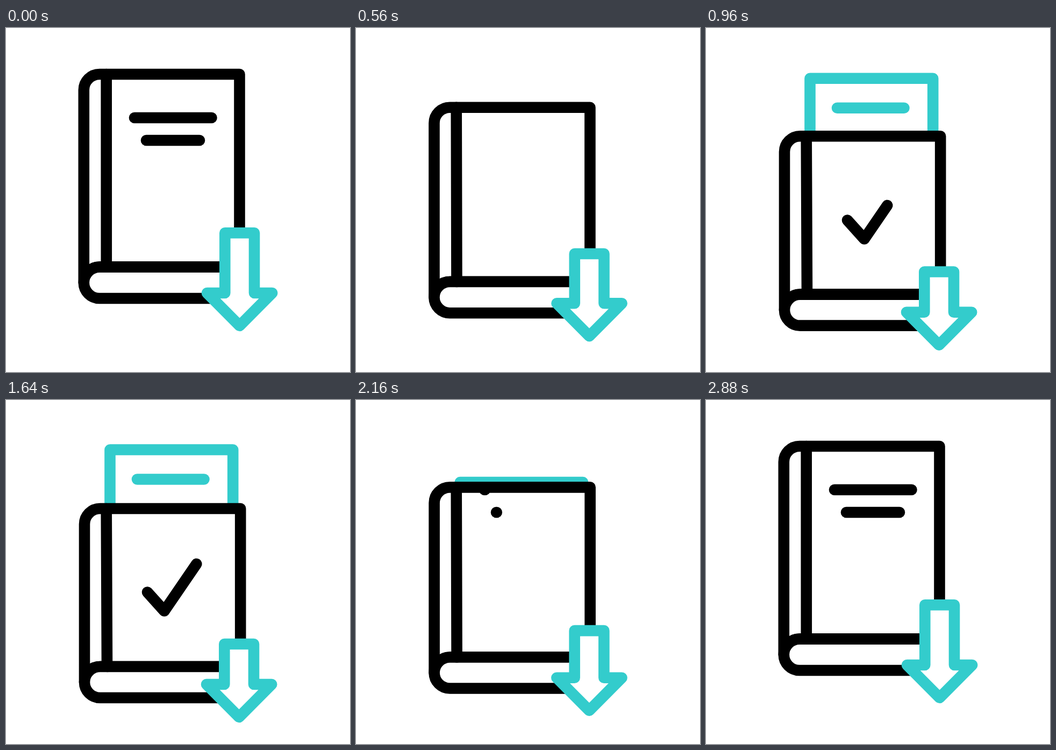
Animation, 640 px wide and 640 px high, one loop 3000 ms. Source, as an HTML page with a canvas:

```html
<!DOCTYPE html>
<html lang="en">
<head>
<meta charset="utf-8">
<title>Book download</title>
<style>
html, body { margin: 0; width: 100%; height: 100%; overflow: hidden; background: #fff; }
canvas { display: block; width: 100vmin; height: 100vmin; margin: 0 auto; }
</style>
</head>
<body>
<canvas id="stage" width="640" height="640"></canvas>
<script>
const ctx = document.getElementById('stage').getContext('2d');
const LOOP = 3000;
const INK = '#000', CYAN = '#33cccc', PAPER = '#fff';

// Strong symmetric ease, cubic-bezier(2/3, 0, 1/3, 1)
function ease(x) {
  if (x <= 0) return 0;
  if (x >= 1) return 1;
  let lo = 0, hi = 1;
  for (let i = 0; i < 24; i++) {
    const s = (lo + hi) / 2, r = 1 - s;
    const bx = 2 * s * r * r + s * s * r + s * s * s;
    if (bx < x) lo = s; else hi = s;
  }
  return lo * lo * (3 - 2 * lo);
}

const ramp = (t, start, end) => ease((t - start) / (end - start));
const mix = (a, b, k) => a + (b - a) * k;

function shape(color, fill, build) {
  ctx.beginPath();
  build();
  if (fill) {
    ctx.fillStyle = fill;
    ctx.fill();
  }
  ctx.strokeStyle = color;
  ctx.stroke();
}

function trace(points) {
  points.forEach(([x, y], i) => i ? ctx.lineTo(x, y) : ctx.moveTo(x, y));
}

// Draws the first part k of a polyline
function trimmed(color, points, k) {
  if (k < 0.002) return;
  const dist = (a, b) => Math.hypot(b[0] - a[0], b[1] - a[1]);
  let total = 0;
  for (let i = 1; i < points.length; i++) total += dist(points[i - 1], points[i]);
  let left = total * k;
  const part = [points[0]];
  for (let i = 1; i < points.length && left > 0; i++) {
    const a = points[i - 1], b = points[i], d = dist(a, b);
    const f = Math.min(1, left / d);
    part.push([mix(a[0], b[0], f), mix(a[1], b[1], f)]);
    left -= d;
  }
  shape(color, null, () => trace(part));
}

function drawSheet(p) {
  const y = mix(270, 92.5, p);
  shape(CYAN, PAPER, () => ctx.rect(193.5, y, 228.7, 150));
  trimmed(CYAN, [[244, y + 55], [368.5, y + 55]], 1);
}

function drawBook(p) {
  const left = mix(144.8, 146, p), right = mix(434.5, 436.2, p);
  const top = mix(86, 202, p), mid = mix(444.6, 496, p), base = mix(503, 554, p);
  const r = (base - mid) / 2, bend = left + r;

  // Cover
  shape(INK, PAPER, () => {
    ctx.moveTo(right, mid);
    ctx.lineTo(right, top);
    ctx.lineTo(bend, top);
    ctx.arc(bend, top + r, r, -Math.PI / 2, Math.PI, true);
    ctx.lineTo(left, base - r);
    ctx.arc(bend, mid + r, r, Math.PI, -Math.PI / 2);
    ctx.closePath();
  });
  // Page block
  shape(INK, PAPER, () => {
    ctx.moveTo(right - 6, mid);
    ctx.lineTo(bend, mid);
    ctx.arc(bend, mid + r, r, -Math.PI / 2, Math.PI / 2, true);
    ctx.lineTo(right - 6, base);
  });
  shape(INK, null, () => trace([[186.7, top], [mix(186.8, 188, p), mid]]));
}

function drawArrow(p) {
  const dx = -p, top = mix(381.3, 454, p), head = mix(493, 529, p);
  shape(CYAN, PAPER, () => {
    trace([
      [407.3, top], [462, top], [462, head], [495.2, head],
      [434.6, head + 61], [374, head], [407.3, head]
    ].map(([x, y]) => [x + dx, y]));
    ctx.closePath();
  });
}

function draw(t) {
  ctx.fillStyle = PAPER;
  ctx.fillRect(0, 0, 640, 640);
  ctx.lineWidth = 20.6;
  ctx.lineCap = ctx.lineJoin = 'round';

  const p = ramp(t, 50, 1050) - ramp(t, 1717, 2717);
  const lines = 1 - ramp(t, 20, 540) + ramp(t, 2100, 2740);
  const check = ramp(t, 560, 1200) - ramp(t, 1620, 2140);

  drawSheet(p);
  drawBook(p);
  trimmed(INK, [[239, 167], [382.5, 167]], lines);
  trimmed(INK, [[261, 209], [360, 209]], lines);
  trimmed(INK, [[263, 357.5], [294.5, 392.5], [354.5, 304.8]], check);
  drawArrow(p);
}

const begin = performance.now();
function tick() {
  draw((performance.now() - begin) % LOOP);
  requestAnimationFrame(tick);
}
tick();
</script>
</body>
</html>
```
